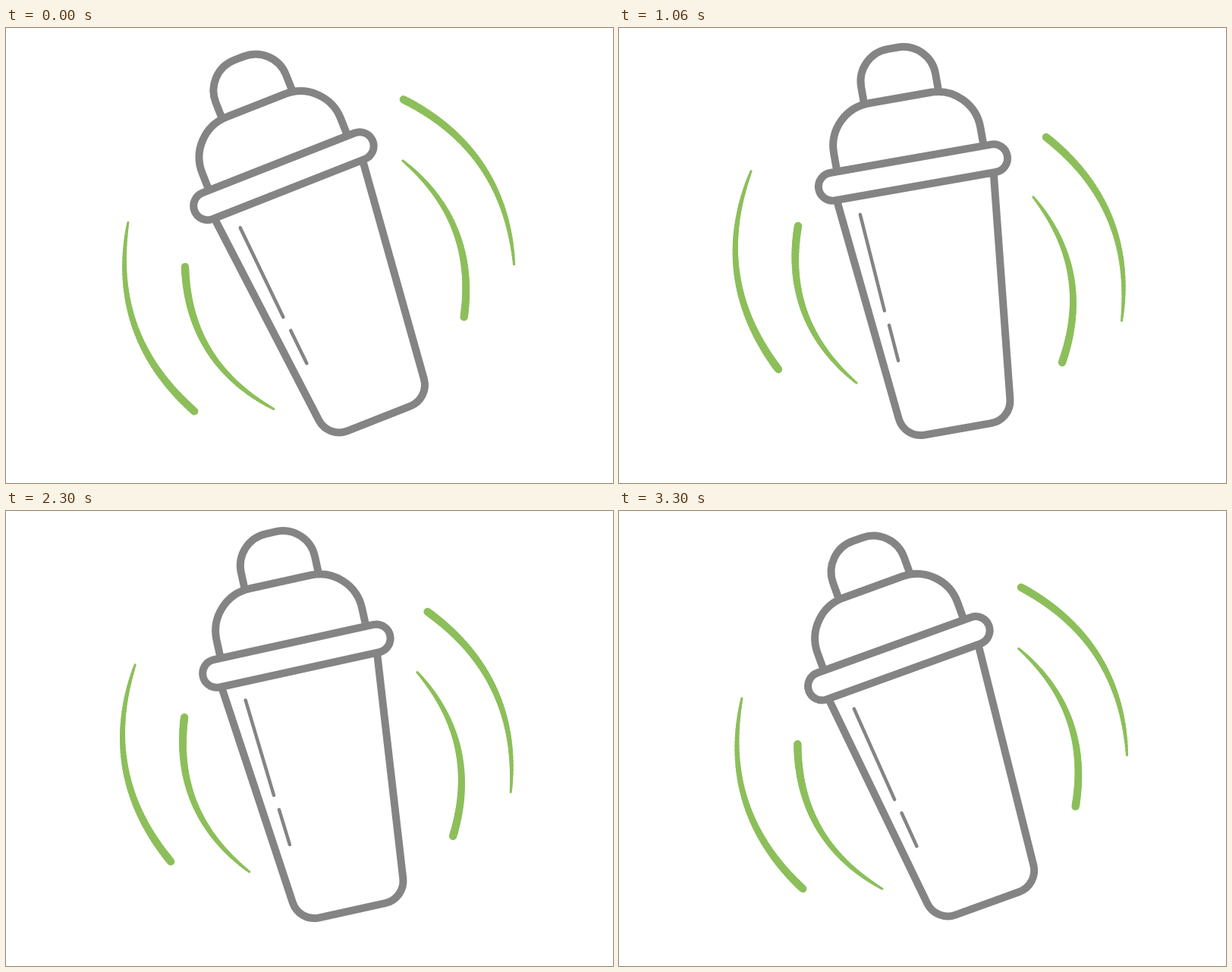
Animation of 800 by 600 pixels, one loop 3320 ms. Source, as an HTML page with a canvas:

```html
<!DOCTYPE html>
<html lang="en">
<head>
<meta charset="utf-8">
<title>Shaker</title>
<style>
  html, body { margin: 0; width: 100%; height: 100%; overflow: hidden; background: #fff; }
  canvas { display: block; }
</style>
</head>
<body>
<canvas id="stage" width="800" height="600"></canvas>
<script>
const ctx = document.getElementById('stage').getContext('2d');
const LOOP = 3320;
const GREY = '#848484', GREEN = '#8cbf5a';

// Upright outline, relative to the shaker's pivot
const shaker = new Path2D();
function dome(left, right, base, top, r) {
  shaker.moveTo(left, base);
  shaker.arcTo(left, top, left + r, top, r);
  shaker.arcTo(right, top, right, top + r, r);
  shaker.lineTo(right, base);
}
dome(-41, 58.5, -210, -276, 43);
dome(-91.7, 104.5, -128, -210, 57);
shaker.moveTo(-35, -210);
shaker.lineTo(50, -210);
shaker.roundRect(-119.5, -128.5, 252.4, 37, 18.5);
shaker.moveTo(-98.5, -90);
shaker.arcTo(-65.4, 233.5, 6, 233.5, 30);
shaker.arcTo(78, 233.5, 111.1, -90, 30);
shaker.lineTo(111.1, -90);

const shine = new Path2D('M-71.5-67.5L-62 63M-59.3 83L-55.5 131');

// Motion arcs: thin tip, control point, thick end
const leftArcs = [
  [174, 189, 119, 329.5, 210, 450],
  [313, 468, 215, 386, 236, 261]
];
const rightArcs = [
  [662.5, 386, 681, 237, 563, 144],
  [546, 223, 626, 321, 584, 441]
];

function taperedArc([x0, y0, cx, cy, x1, y1]) {
  const steps = 50;
  const mix = (a, c, b, t) => (1 - t) ** 2 * a + 2 * t * (1 - t) * c + t * t * b;
  let px = x0, py = y0;
  for (let i = 1; i <= steps; i++) {
    const t = i / steps, x = mix(x0, cx, x1, t), y = mix(y0, cy, y1, t);
    ctx.lineWidth = 2 + 8.4 * Math.sqrt(t);
    ctx.beginPath();
    ctx.moveTo(px, py);
    ctx.lineTo(x, y);
    ctx.stroke();
    px = x;
    py = y;
  }
}

function drawArcs(arcs, degrees, x, y) {
  ctx.save();
  ctx.translate(x, y);
  ctx.rotate(degrees * Math.PI / 180);
  ctx.translate(-x, -y);
  ctx.strokeStyle = GREEN;
  arcs.forEach(taperedArc);
  ctx.restore();
}

// Slower swing up, quicker swing back: 40 ticks at 60 per second
function angleAt(ms) {
  const tick = Math.ceil(ms * 0.06 - 0.1) % 40;
  const up = tick * 0.0439, down = ((40 - tick) / 16) ** 0.95;
  return -21.5 + 11.5 * Math.min(up, down);
}

function draw(ms) {
  const angle = angleAt(ms);
  ctx.fillStyle = '#fff';
  ctx.fillRect(0, 0, 800, 600);
  ctx.lineCap = 'round';
  drawArcs(leftArcs, angle + 10, 503.5, 288);
  drawArcs(rightArcs, angle + 10, 296.5, 313.5);

  ctx.save();
  ctx.translate(400, 300);
  ctx.rotate(angle * Math.PI / 180);
  ctx.strokeStyle = GREY;
  ctx.lineCap = 'butt';
  ctx.lineWidth = 10;
  ctx.stroke(shaker);
  ctx.lineCap = 'round';
  ctx.lineWidth = 4.5;
  ctx.stroke(shine);
  ctx.restore();
}

const start = performance.now();
function loop() {
  draw((performance.now() - start) % LOOP);
  requestAnimationFrame(loop);
}
loop();
</script>
</body>
</html>
```
